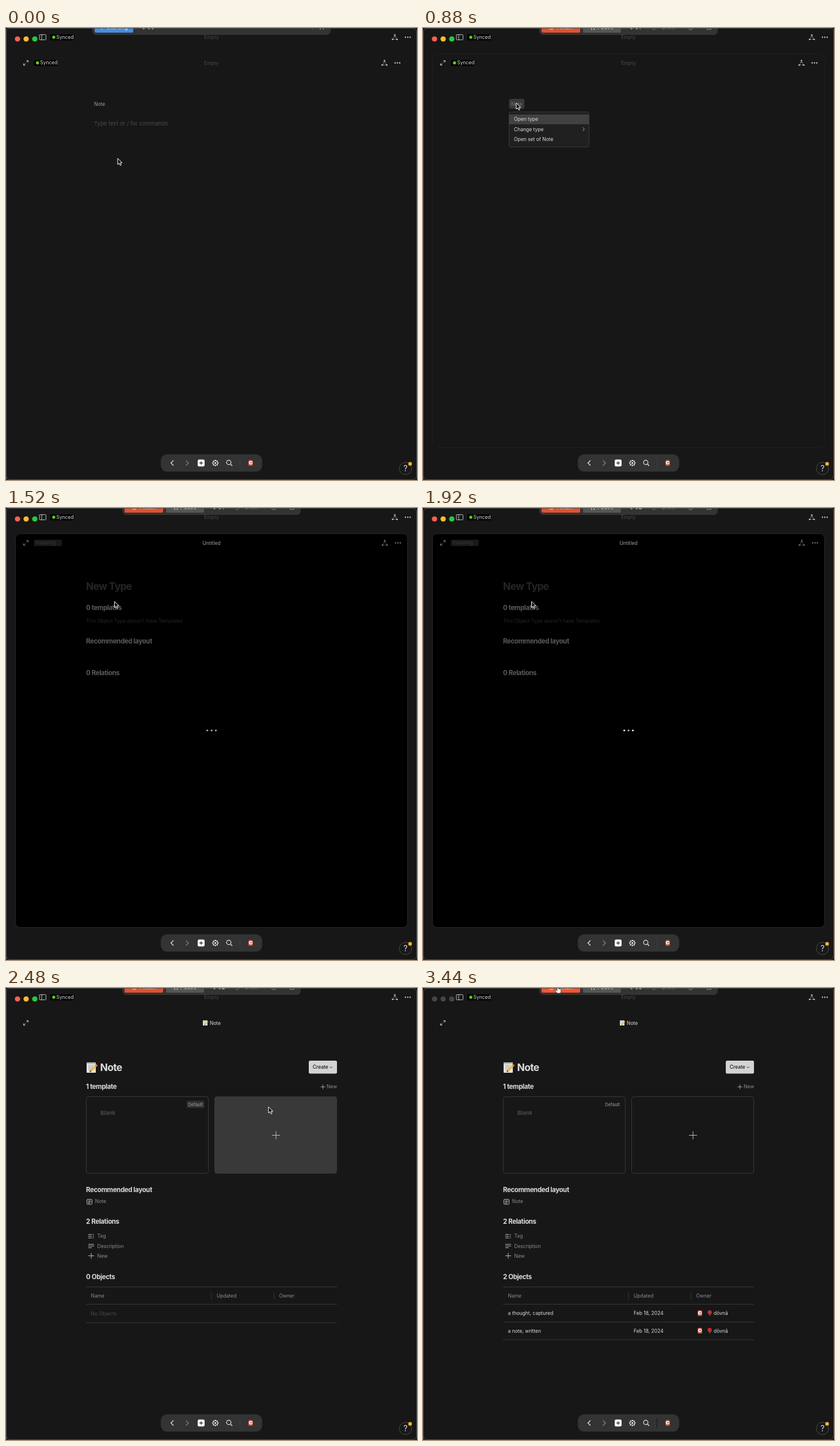
Recreate the animation shown at these times as an HTML page. Size 714 px wide and 784 px high, loop 3.52 s.

```html
<!DOCTYPE html>
<html lang="en">
<head>
<meta charset="utf-8">
<title>Note type</title>
<style>
  html, body { margin: 0; width: 100%; height: 100%; overflow: hidden; background: #171717; }
  svg { display: block; width: 714px; height: 784px; font: 8.5px Inter, sans-serif; }
  text { fill: #dcdcdc; white-space: pre; }
  .badge text, .tag { font-size: 7.6px; fill: #a0a0a0; }
  .badge rect, #defaultBox { fill: #303030; }
  .pale .badge rect, .pale #defaultBox { fill: none; }
  .pale #dockLine { stroke: #151515; }
  .title { font-size: 17.5px; font-weight: 700; letter-spacing: -.7px; }
  .head { font-size: 11.5px; font-weight: 700; letter-spacing: -.4px; }
  .gray { fill: #8c8c8c; }
  .dim { fill: #4a4a4a; }
  .mid { text-anchor: middle; }
  .line { fill: none; stroke: #bdbdbd; }
  .rule { fill: none; stroke: #383838; }
  #loading .head { fill: #5a5a5a; }
  #loading .faint { fill: #252525; }
  #recorder text { font-size: 9.5px; font-weight: 600; }
</style>
</head>
<body>
<svg id="stage" viewBox="0 0 714 784">
  <defs>
    <g id="graph">
      <path class="line" d="M0-3L-3.7 3.5H3.7Z" stroke-width=".9" stroke-dasharray="4.5 1.5"/>
      <g fill="#c4c4c4"><circle cy="-4" r="1.3"/><circle cx="-4" cy="3.8" r="1.3"/><circle cx="4" cy="3.8" r="1.3"/></g>
    </g>
    <g id="more" fill="#c4c4c4"><circle cx="-4" r="1.2"/><circle r="1.2"/><circle cx="4" r="1.2"/></g>
    <path id="expand" class="line" d="M.8-4H4V-.8M4-4L.8-.8M-.8 4H-4V.8M-4 4L-.8.8"/>
    <path id="plus" d="M-4 0H4M0-4V4"/>
    <g id="badge">
      <rect x="77" y="11" width="41" height="10.5" rx="2"/>
      <circle cx="83" cy="16" r="2.7" fill="#59d50c"/>
      <text x="87.5" y="18.8">Synced</text>
    </g>
    <g id="memo">
      <rect x="1" y="1" width="16" height="18" rx="1" fill="#e4e4e2"/>
      <path d="M1 1H17V4H1Z" fill="#b9b9b9"/>
      <path d="M4 7H13M4 10H11M4 13H9" stroke="#9aa0a4"/>
      <path d="M8 16L18 6" stroke="#f2b632" stroke-width="3.5"/>
      <path d="M17 7L19 5" stroke="#dc6a62" stroke-width="3.5"/>
      <path d="M6 18L7 14.5L9.5 17Z" fill="#4d4034"/>
    </g>
    <g id="avatar">
      <rect x="-4" y="-5" width="8" height="10" rx="2" fill="#c8483c"/>
      <circle cy="-.5" r="3.2" fill="#f1e2d8"/>
      <circle cx=".5" cy="-.5" r="1.1" fill="#5c403c"/>
    </g>
    <g id="rose">
      <path d="M0 0V5M0 3L2.5 1.5" stroke="#3c7a38" stroke-width="1.2"/>
      <circle cy="-1.5" r="3.6" fill="#c92a2e"/>
    </g>
  </defs>

  <rect width="714" height="784" fill="#171717"/>
  <rect id="panel" x="16.5" y="44.5" width="681" height="683" rx="8"/>

  <!-- window header -->
  <g id="lights"></g>
  <path class="line" d="M59 11.5H68.5Q69.5 11.5 69.5 12.5V19.5Q69.5 20.5 68.5 20.5H59Q58 20.5 58 19.5V12.5Q58 11.5 59 11.5ZM62 11.5V20.5"/>
  <use href="#badge" class="badge"/>
  <text class="mid dim" x="357" y="19">Empty</text>
  <use href="#graph" x="675.5" y="16"/>
  <use href="#more" x="698" y="16"/>
  <use id="expander" href="#expand" x="34.5" y="60.5"/>

  <!-- empty note -->
  <g id="note">
    <use href="#badge" class="badge" x="-28.3" y="44.5"/>
    <text class="mid dim" x="357" y="63.5">Empty</text>
    <use href="#graph" x="657.5" y="60.5"/>
    <use href="#more" x="680" y="60.5"/>
    <rect id="noteHover" x="149.5" y="123" width="26.5" height="17" rx="3" fill="#393939"/>
    <text id="noteLabel" x="153" y="134.7">Note</text>
    <text id="placeholder" class="dim" x="153" y="169" font-size="9.6">Type text or / for commands</text>
    <path id="handle" d="M142.5 160V173M149.5 160V173M145.8 156V176" stroke="#303030" stroke-dasharray="3 1"/>
  </g>

  <g id="menu">
    <rect x="149.5" y="145.5" width="139" height="61" rx="4" fill="#202020" stroke="#383838"/>
    <rect x="150" y="150" width="138" height="17" fill="#414141"/>
    <text x="158" y="161.2">Open type</text>
    <text x="158" y="178.6">Change type</text>
    <text x="158" y="196.2">Open set of Note</text>
    <path class="line" d="M277.5 172.5L280.5 175.5L277.5 178.5"/>
  </g>

  <!-- type page while loading -->
  <g id="loading">
    <rect x="48.5" y="55" width="48.5" height="11" rx="2" fill="#191919"/>
    <text class="tag" x="51.5" y="63.3" style="fill:#3b3b3b">Preparing...</text>
    <text class="mid" x="357" y="63.5" style="fill:#a0a0a0">Untitled</text>
    <g opacity=".6"><use href="#graph" x="658" y="60.5"/><use href="#more" x="681" y="60.5"/></g>
    <text class="title faint" x="139" y="142">New Type</text>
    <text class="head" x="139" y="177">0 templates</text>
    <text class="faint" x="139" y="199.2" font-size="8.6">This Object Type doesn't have Templates</text>
    <text class="head" x="139" y="235">Recommended layout</text>
    <text class="head" x="139" y="290">0 Relations</text>
    <g id="dots"></g>
  </g>

  <!-- type page -->
  <g id="page">
    <use href="#memo" transform="translate(341.5 55.5) scale(.5)"/>
    <text x="354" y="63.5">Note</text>
    <use href="#memo" x="139" y="128"/>
    <text class="title" x="163.5" y="143.7">Note</text>
    <rect x="526" y="126" width="49" height="22.5" rx="2.5" fill="#d3d3d3"/>
    <text x="532.8" y="140" font-weight="500" style="fill:#171717">Create</text>
    <path d="M562.5 136.5L564.7 138.5L567 136.5" fill="none" stroke="#333"/>
    <text class="head" x="139" y="175.3">1 template</text>
    <use href="#plus" x="550.5" y="171.5" stroke="#a0a0a0"/>
    <text class="gray" x="557" y="174.3">New</text>
    <rect class="rule" x="139.5" y="188.5" width="212" height="133" rx="4"/>
    <rect id="defaultBox" x="314" y="195.5" width="30.5" height="12.5" rx="2"/>
    <text class="tag" x="316.3" y="204.5">Default</text>
    <text class="dim" x="164" y="219.6" font-size="9.6" font-weight="700">Blank</text>
    <rect id="card" class="rule" x="362.5" y="188.5" width="212" height="133" rx="4"/>
    <path class="line" d="M462 255.5H476M469 248.5V262.5"/>
    <text class="head" x="139" y="354">Recommended layout</text>
    <path class="line" d="M142 366.5H148Q149.500 366.5 149.500 368V373.500Q149.500 375 148 375H142Q140.500 375 140.500 373.500V368Q140.500 366.5 142 366.5ZM142.500 369H147.500M142.500 371H147.500M142.500 373H146"/>
    <text class="gray" x="154.800" y="373.2">Note</text>
    <text class="head" x="139" y="409">2 Relations</text>
    <path class="line" d="M143 427.5H149M143 430.5H149M143 433.5H149M150.500 427.5H152.500M150.500 430.5H152.500M150.500 433.5H152.500M143 444.5H153M143 447.5H153M143 450.5H149M143 464.5H153M148 459.5V469.5"/>
    <text class="gray" x="158.500" y="432.700">Tag</text>
    <text class="gray" x="158.500" y="450.500">Description</text>
    <text class="gray" x="158.500" y="467.500">New</text>
    <text id="count" class="head" x="139" y="505.300"></text>
    <path class="rule" d="M139 518.5H575M139 548.5H575M357 528V540M466 528V540"/>
    <text class="gray" x="147.500" y="536.700">Name</text>
    <text class="gray" x="366" y="536.700">Updated</text>
    <text class="gray" x="474.500" y="536.700">Owner</text>
    <g id="noRows">
      <text class="dim" x="147.500" y="568">No Objects</text>
      <path class="rule" d="M139 580.5H575"/>
    </g>
    <g id="rows"></g>
  </g>

  <!-- dock and help -->
  <rect x="269" y="739.5" width="176" height="30" rx="11" fill="#333"/>
  <path d="M291 750L286.500 754.500L291 759" fill="none" stroke="#eee" stroke-width="1.200"/>
  <path d="M312.500 750L317 754.500L312.500 759" fill="none" stroke="#858585" stroke-width="1.200"/>
  <rect x="333" y="748.500" width="12" height="12" rx="2.500" fill="#fff"/>
  <path d="M336 754.500H342M339 751.500V757.500" stroke="#333" stroke-width="1.300"/>
  <g id="flower" fill="#eee"></g>
  <circle cx="387" cy="753.500" r="3.800" fill="none" stroke="#eee" stroke-width="1.200"/>
  <path d="M390 756.500L393 759.500" stroke="#eee" stroke-width="1.300"/>
  <path id="dockLine" d="M406.500 746V763" stroke="#3e3e3e"/>
  <use href="#avatar" x="425" y="754.500"/>
  <circle cx="694" cy="764" r="10.700" fill="#191919" stroke="#4a4a4a"/>
  <text class="mid" x="694" y="769" font-size="14">?</text>
  <circle cx="702" cy="756" r="3.200" fill="#f5b027"/>

  <!-- recorder bar, cut off by the top edge -->
  <g id="recorder">
    <g id="starting">
      <rect x="150" y="-30" width="414" height="42" rx="7" fill="#333"/>
      <rect x="154" y="-20" width="67" height="28" rx="2.500" fill="#448fe4"/>
      <path d="M162.500-5V0M166.500-5V3M170.500-5V0" stroke="#b9d8fa"/>
      <text x="175" y="2">Starting</text>
      <text x="236" y="2">0:00</text>
      <path d="M532.500-5V4" stroke="#454545"/>
      <path class="line" d="M545 3L548.500-1L552 3"/>
    </g>
    <g id="recording">
      <rect x="202" y="-30" width="310" height="42" rx="7" fill="#333"/>
      <rect id="finish" x="206" y="-20" width="67" height="28" rx="2.500"/>
      <circle cx="223" cy="-2.500" r="5" fill="none" stroke="#ffd9cf"/>
      <text x="232.500" y="2">Finish</text>
      <rect x="278" y="-20" width="66" height="28" rx="2.500" fill="#565656"/>
      <path d="M293-6V3M297.500-6V3" stroke="#ddd" stroke-width="1.500"/>
      <text x="303" y="2">Pause</text>
      <text id="timer" x="359" y="2"></text>
      <path d="M388.500-5V4M449.500-5V4M481.500-5V4" stroke="#3d3d3d"/>
      <path d="M399 2.500H403M404 2L408-2" stroke="#777" fill="none"/>
      <text x="415" y="2" style="fill:#777">Draw</text>
      <circle cx="465" cy="-1.500" r="4.500" fill="none" stroke="#8a8a8a"/>
      <path d="M493.500-4V2.500H500.500V-4" fill="none" stroke="#8a8a8a"/>
    </g>
  </g>

  <path d="M.5 784V8Q.5.5 8 .5H706Q713.500.5 713.500 8V776Q713.500 783.500 706 783.500H8Q.5 783.500.5 776" fill="none" stroke="#505050"/>
  <g id="cursor" stroke-linejoin="round">
    <path id="arrow" d="M0 0V10.800L2.600 8.500L4.300 12.400L6.200 11.600L4.500 7.800H7.800Z" fill="#111" stroke="#fff"/>
    <path id="hand" d="M0-2Q1-4 2-2V2L6 3Q7 3.500 7 5L6 10H0L-4 5Q-4 3-2 4.500L0 6Z" fill="#fff" stroke="#222" stroke-width=".8"/>
  </g>
</svg>
<script>
const LOOP = 3520, STEP = 80;
const el = id => document.getElementById(id);
const show = (id, on) => { el(id).style.display = on ? "" : "none"; };

const lightColors = ["#ff5f57", "#febc2e", "#28c840"];
el("lights").innerHTML = lightColors.map((_, i) => `<circle cx="${20 + 15 * i}" cy="19" r="4.6"/>`).join("");
el("dots").innerHTML = [348, 355.4, 362.8].map(x => `<rect x="${x}" y="384.500" width="3.400" height="2.800" rx="1.300"/>`).join("");

el("flower").innerHTML = '<circle cx="363.700" cy="754.500" r="1.500"/>' + [...Array(8)].map((_, i) => {
  const a = i * Math.PI / 4;
  return `<circle cx="${363.7 + 4.3 * Math.cos(a)}" cy="${754.5 + 4.3 * Math.sin(a)}" r="1.300"/>`;
}).join("");

el("rows").innerHTML = ["a thought, captured", "a note, written"].map((name, i) => `
  <g transform="translate(0 ${30.5 * i})">
    <text x="147.500" y="567.300">${name}</text>
    <text x="366" y="567.300">Feb 18, 2024</text>
    <use href="#avatar" x="481" y="564"/><use href="#rose" x="498" y="564"/>
    <text x="505" y="567.300">dōvnā</text>
    <path class="rule" d="M139 579.500H575"/>
  </g>`).join("");

// Pointer moves: start, end, target x, target y.
const moves = [
  [240, 560, 162, 130],
  [880, 1120, 188.5, 162],
  [2000, 2400, 456, 206],
  [2720, 3040, 400, 140],
  [3120, 3440, 233, -1],
];

function pointer(t) {
  let x = 194, y = 226;
  for (const [start, end, tx, ty] of moves) {
    const p = Math.min(1, Math.max(0, (t - start) / (end - start)));
    const k = p * p * (3 - 2 * p);
    x += (tx - x) * k;
    y += (ty - y) * k;
  }
  return [x, y];
}

function draw(t) {
  const menuOpen = t >= 640 && t < 1360;
  const loading = t >= 1520 && t < 2480;
  const onFinish = t >= 3440;
  const [x, y] = pointer(t);

  el("stage").classList.toggle("pale", (t >= 1280 && t < 1520) || t >= 2800);
  el("panel").setAttribute("fill", loading ? "#000" : "#171717");
  el("panel").setAttribute("stroke", loading ? "#282828" : t >= 160 && t < 1280 ? "#1f1f1f" : "none");
  el("expander").style.opacity = loading ? .6 : 1;

  show("note", t < 1520);
  show("noteHover", t >= 560 && t < 1360);
  el("noteLabel").style.fill = t >= 560 && t < 1360 ? "#777" : "#a0a0a0";
  show("placeholder", t < 640);
  show("handle", t >= 1360);
  show("menu", menuOpen);
  el("menu").style.opacity = t === 640 || t === 1280 ? .5 : 1;

  show("loading", loading);
  [...el("dots").children].forEach((dot, i) => {
    dot.setAttribute("fill", t < 1920 ? "#a5a5a5" : i === 1 ? "#b0b0b0" : "#f0f0f0");
  });

  show("page", t >= 2480);
  el("card").style.fill = y > 188 ? "#393939" : "none";
  el("count").textContent = (t < 2800 ? 0 : 2) + " Objects";
  show("noRows", t < 2800);
  show("rows", t >= 2800);

  show("starting", t < 160);
  show("recording", t >= 160);
  el("timer").textContent = "0:0" + Math.floor((t + 120) / 1000);
  el("finish").setAttribute("fill", onFinish ? "#ff552f" : "#e5502d");
  lightColors.forEach((c, i) => el("lights").children[i].setAttribute("fill", onFinish ? "#454545" : c));

  el("cursor").setAttribute("transform", `translate(${x} ${y})`);
  show("arrow", !onFinish);
  show("hand", onFinish);
}

const begin = performance.now();
function tick() {
  const t = (performance.now() - begin) % LOOP;
  draw(Math.floor(t / STEP) * STEP);
  requestAnimationFrame(tick);
}
tick();
</script>
</body>
</html>
```
